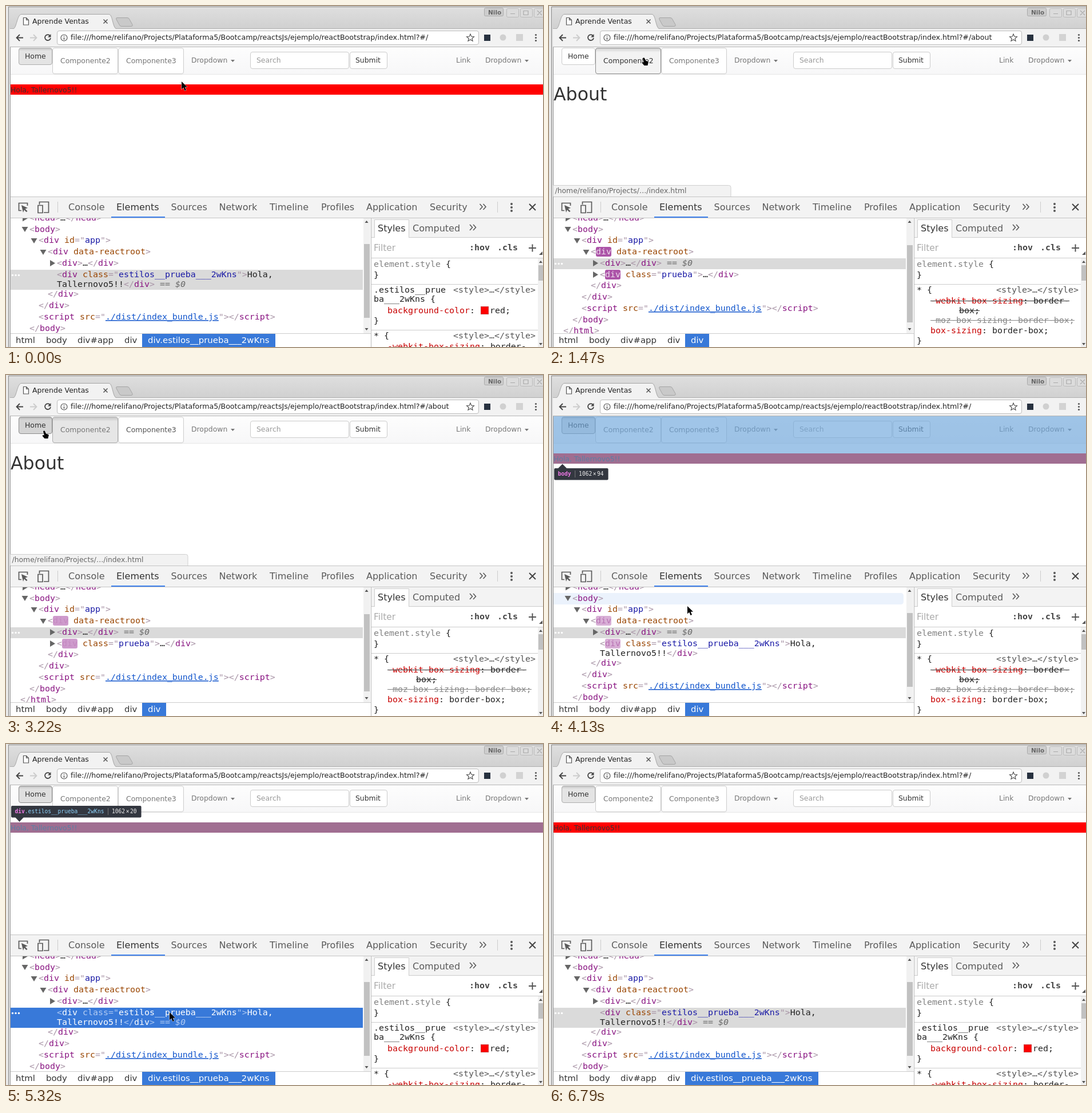
An HTML page for the animation above (6.86 s loop, 939 by 596 pixels).

```html
<!DOCTYPE html>
<html lang="es">
<head>
<meta charset="utf-8">
<style>
html, body { margin: 0; width: 100%; height: 100%; overflow: hidden; background: #fff; }
svg { display: block; }
text { font-family: "DejaVu Sans", sans-serif; white-space: pre; }
.m { font-family: "DejaVu Sans Mono", monospace; }
</style>
</head>
<body>
<svg width="939" height="596" viewBox="0 0 939 596">
  <defs>
    <clipPath id="treeClip"><rect x="8" y="371" width="617" height="201"/></clipPath>
    <linearGradient id="titleFill" x2="0" y2="1"><stop stop-color="#dedede"/><stop offset="1" stop-color="#d0d0d0"/></linearGradient>
    <linearGradient id="navFill" x2="0" y2="1"><stop stop-color="#fdfdfd"/><stop offset="1" stop-color="#f7f7f8"/></linearGradient>
    <linearGradient id="pressed" x2="0" y2="1"><stop stop-color="#000" stop-opacity=".14"/><stop offset=".16" stop-color="#000" stop-opacity="0"/></linearGradient>
  </defs>
  <g id="chrome"></g>
  <g id="live"></g>
</svg>
<script>
const LOOP = 6860, STEP = 70;
const GREETING = 'Hola, ', SCHOOL = 'Tallernovo5!!', CLASS = 'estilos__prueba___2wKns';
const URL_BASE = 'file:///home/relifano/Projects/Plataforma5/Bootcamp/reactsJs/ejemplo/reactBootstrap/index.html?#/';

// SVG string helpers
const text = (x, y, s, size = 15, fill = '#333', extra = '') =>
  `<text x="${x}" y="${y}" font-size="${size}" fill="${fill}" ${extra}>${s}</text>`;
const mono = (x, y, s, fill = '#222', extra = '') => text(x, y, s, 14.95, fill, `class="m" ${extra}`);
const rect = (x, y, w, h, fill, extra = '') =>
  `<rect x="${x}" y="${y}" width="${w}" height="${h}" fill="${fill}" ${extra}/>`;
const box = (x, y, w, h, fill, stroke, r = 3.5) =>
  rect(x + .5, y + .5, w - 1, h - 1, fill, `stroke="${stroke}" rx="${r}"`);
const path = (d, fill = 'none', stroke = 'none', width = 1, extra = '') =>
  `<path d="${d}" fill="${fill}" stroke="${stroke}" stroke-width="${width}" ${extra}/>`;
const dots = (x, y, dx, dy, r, fill) => [-1, 0, 1].map(i =>
  `<circle cx="${x + i * dx}" cy="${y + i * dy}" r="${r}" fill="${fill}"/>`).join('');
const span = (fill, s) => `<tspan fill="${fill}">${s}</tspan>`;
const mix = (a, b, p) => `rgb(${a.map((v, i) => Math.round(v + (b[i] - v) * p))})`;
const caret = x => path(`M${x} 94h7l-3.5 4z`, '#777');

function drawChrome() {
  const out = [];
  const add = (...parts) => out.push(...parts);
  // window frame and title bar
  add(rect(0, 0, 939, 596, '#e9e9e9'), rect(4, 1, 935, 595, '#858585'),
    rect(5, 2, 934, 594, '#e2e2e2'), rect(6, 3, 933, 37, 'url(#titleFill)'), rect(7, 40, 932, 32, '#f2f2f2'),
    path('M7.5 72V596', 'none', '#999'), path('M7 39.5H939', 'none', '#b0b0b0'),
    path('M12 40.5C19 39 19 15 27 14.5H180C187 15 186 39 194 40.5', '#f2f2f2', '#a5a5a5'), rect(12, 40, 182, 2, '#f2f2f2'),
    path('M194 20.5H212q3 0 4 3l5 9q1 3-2 3H202q-3 0-4-3l-5-9q-1-3 1-3z', '#c9c9c9', '#a5a5a5'),
    path('M30.5 20.5h5l4 4v8.5h-9zM35.5 20.5v4h4', '#fff', '#555', 1.2),
    text(46, 31, 'Aprende Ventas', 12.5, '#222'),
    path('M170.5 23.5l7 7m0-7l-7 7', 'none', '#555', 1.5),
    box(836, 3, 34, 15, '#cdcdcd', '#aaa', 2), text(843, 15, 'Nilo', 10.5, '#666', 'font-weight="bold"'));
  for (const x of [875, 899, 923]) add(box(x, 4, 22, 16, '#dcdcdc', '#bababa', 2));
  add(path('M882 13.5h8M905 8.5h8v7h-8zM929 8l8 8m0-8l-8 8', 'none', '#aaa', 1.2));
  // toolbar
  add(path('M30 55.5H19m5-5.5l-5.5 5.5 5.5 5.5', 'none', '#444', 1.8),
    path('M42 55.5H53m-5-5.5l5.5 5.5-5.5 5.5', 'none', '#ccc', 1.8),
    path('M77 52a5 5 0 1 0 1 4', 'none', '#444', 1.8), path('M78.5 49v5.5h-5.5z', '#444'),
    box(89, 43, 738, 25, '#fff', '#bcbcbc'),
    '<circle cx="101.5" cy="55.5" r="5.5" fill="none" stroke="#555" stroke-width="1.2"/>',
    path('M101.5 52v1.5m0 1.5v4', 'none', '#555', 1.4),
    path('M812 49l1.8 4.3 4.6.4-3.5 3 1.1 4.6-4-2.5-4 2.5 1.1-4.6-3.5-3 4.6-.4z', 'none', '#555', 1.2),
    rect(836, 50, 11, 11, '#27313f'), '<circle cx="869" cy="55" r="5.5" fill="#d0d0d0"/>',
    rect(892, 49, 12, 12, '#d3d3d3'), dots(926.5, 55.5, 0, 5, 1.6, '#555'),
    path('M7 71.5H939', 'none', '#b5b5b5'));
  // page and navigation bar
  add(rect(8, 72, 931, 262, '#fff'), rect(8, 72, 931, 47, 'url(#navFill)'), path('M8 119.5H939', 'none', '#e7e7e7'),
    text(324, 99, 'Dropdown', 12.4, '#777'), caret(393),
    box(427, 80, 173, 30, '#fff', '#ccc'), text(438, 99, 'Search', 12.4, '#999'),
    box(601, 80, 66, 30, '#fff', '#ccc'), text(611, 99, 'Submit', 12.4),
    text(787, 99, 'Link', 12.4, '#777'), text(838, 99, 'Dropdown', 12.4, '#777'), caret(907));
  // developer tools
  add(rect(8, 333, 931, 263, '#fff'), rect(8, 333, 931, 37, '#f3f3f3'),
    path('M8 333.5H939M8 370.5H939', 'none', '#c4c4c4'),
    path('M27 357.5H22.5V344.5H37.5V349', 'none', '#5a5a5a', 1.7),
    path('M27 348l11 5-4.5 1.5 4 4-1.8 1.8-4-4L30 361z', '#5a5a5a'),
    path('M58.5 347V342.5H74.5V361H66', 'none', '#5a5a5a', 1.7), path('M56 348.5h8v13h-8z', '#f3f3f3', '#5a5a5a', 1.7),
    path('M90.5 342v19M859.5 342v19', 'none', '#ccc'));
  const tabs = { Console: 109, Elements: 193, Sources: 288.5, Network: 372.5, Timeline: 461, Profiles: 551, Application: 630, Security: 741 };
  for (const [name, x] of Object.entries(tabs)) add(text(x, 357, name, 16, name === 'Elements' ? '#333' : '#5a5a5a'));
  add(rect(184, 368, 94, 2, '#3f82ee'),
    path('M828.5 346l4.5 5-4.5 5m6-10l4.5 5-4.5 5', 'none', '#5a5a5a', 1.6),
    dots(884, 352, 0, 6, 2, '#5a5a5a'), path('M915 346l11 11m0-11l-11 11', 'none', '#444', 2));
  // tree scroll bar, breadcrumb bar
  add(rect(625, 371, 12, 201, '#f1f1f1'), path('M627.5 379h6l-3-4zM627.5 563h6l-3 4z', '#555'),
    path('M8 572.5H638', 'none', '#ccc'), path('M638.5 371V596', 'none', '#bbb'));
  [['html', 17], ['body', 70], ['div#app', 125], ['div', 207]].forEach(([s, x]) => add(text(x, 589, s, 14.9)));
  // styles pane header
  add(rect(639, 371, 300, 34, '#f3f3f3'), path('M639 404.5H939M639 440.5H939', 'none', '#ccc'),
    path('M644.5 405V373.5H704.5V405', '#fff', '#ccc'),
    text(650, 394, 'Styles', 16), text(711, 394, 'Computed', 16, '#5a5a5a'),
    path('M811 382l4.5 5-4.5 5m6-10l4.5 5-4.5 5', 'none', '#5a5a5a', 1.6),
    text(643, 428, 'Filter', 15.4, '#aaa'),
    mono(810, 427, ':hov', '#444', 'font-weight="bold"'), mono(859, 427, '.cls', '#444', 'font-weight="bold"'),
    path('M914 423h13M920.5 416.5v13', 'none', '#555', 2), path('M938 429v6h-6z', '#555'),
    mono(643, 456, span('#808080', 'element.style') + ' {'), mono(643, 475, '}'),
    path('M639 486.5H930', 'none', '#ccc'),
    rect(930, 441, 9, 155, '#f1f1f1'), rect(931, 453, 8, 27, '#c1c1c1'),
    path('M932 449h6l-3-4zM932 589h6l-3 4z', '#555'));
  return out.join('');
}

// Pointer track: time, x, y
const TRACK = [[280, 307, 132], [700, 180, 98], [770, 180, 98], [980, 164, 91], [1680, 164, 91],
  [1960, 232, 90], [2240, 232, 90], [2450, 150, 93], [2730, 150, 93], [3150, 65, 98], [3850, 65, 98],
  [4130, 242, 404], [4200, 242, 404], [4480, 262, 550], [4550, 262, 550], [4900, 286, 469],
  [5320, 286, 469], [5670, 425, 477], [5880, 425, 477], [6300, 948, 18]];

function pointerAt(t) {
  const next = TRACK.findIndex(k => k[0] > t);
  if (next === 0) return TRACK[0].slice(1);
  if (next < 0) return TRACK.at(-1).slice(1);
  const a = TRACK[next - 1], b = TRACK[next];
  const u = (t - a[0]) / (b[0] - a[0]), e = u * u * (3 - 2 * u);
  return [1, 2].map(i => a[i] + (b[i] - a[i]) * e);
}

// Page changes: time, page
const VISITS = [[0, 'home'], [1260, 'about'], [1960, 'ejemplos'], [2520, 'about'], [3290, 'home']];

// Tree rows while the home page is shown: top, bottom, element
const ROWS = [[381, 400, 'body'], [400, 420, '#app'], [420, 440, 'root'], [440, 460, 'nav'], [460, 496, 'hello'],
  [496, 515, 'root'], [515, 535, '#app'], [535, 554, ''], [554, 572, 'body']];

function drawButtons(page, hover, t) {
  const home = page === 'home', homeHover = hover === 'home', focused = home && t >= 3290 && t < 6720;
  const shade = (x, w, h) => rect(x + 1, 74, w - 2, h, 'url(#pressed)', 'rx="3"');
  let out = box(22, 73, 59, 30, homeHover ? '#d4d4d4' : focused ? '#dfdfdf' : home ? '#e4e4e4' : '#fff',
    homeHover || focused ? '#8c8c8c' : home ? '#adadad' : '#ccc');
  if (home || homeHover) out += shade(22, 59, 28);
  out += text(33, 92, 'Home', 12.45);
  [['about', 81, 'Componente2'], ['ejemplos', 196, 'Componente3']].forEach(([id, x, label]) => {
    const hovered = hover === id, active = page === id;
    const fill = !active ? '#fff' : hovered ? '#f3f3f3' : '#e6e6e6';
    out += box(x, 73, 115, 46, fill, hovered ? '#8c8c8c' : active ? '#adadad' : '#ccc');
    if (active) out += shade(x, 115, 44);
    const visited = id === 'ejemplos' && page === 'about' && t >= 2520;
    out += text(x + 14, 100, label, 12.45, hovered ? '#333' : visited ? '#555' : '#777');
  });
  return out;
}

const NORMAL = { mark: '#a894a6', tag: '#881280', name: '#994500', value: '#1a1aa6', text: '#222', ref: '#666' };
const CHOSEN = { mark: '#a9c6f2', tag: '#fff', name: '#b5cdf3', value: '#fff', text: '#fff', ref: '#b5cdf3' };

function drawTree(page, selected, blue, hoverRow, fade) {
  const home = page === 'home';
  const open = (name, attrs = '', c = NORMAL, tag = c.tag) =>
    span(c.mark, '&lt;') + span(tag, name) + attrs + span(c.mark, '&gt;');
  const close = (name, c = NORMAL) => span(c.mark, '&lt;/') + span(c.tag, name) + span(c.mark, '&gt;');
  const attr = (name, value, c = NORMAL) =>
    ' ' + span(c.name, name) + span(c.mark, '="') + span(c.value, value) + span(c.mark, '"');
  const down = (x, y) => path(`M${x - 5.5} ${y - 4}h11l-5.5 9z`, '#666');
  const right = (x, y) => path(`M${x - 4} ${y - 5.5}v11l9-5.5z`, '#666');
  const ref = c => span(c.ref, ' == <tspan font-style="italic">$0</tspan>');
  const flashTag = mix([255, 255, 255], [136, 18, 128], fade);
  const flash = (x, y) => fade < 1
    ? rect(x + 9, y - 13, 27, 17, `rgba(158,54,153,${1 - fade})`, 'rx="3"') : '';

  let out = '';
  if (hoverRow) out += path(`M8 ${hoverRow[0]}H615q5 0 5 5V${hoverRow[1] - 4}q0 5-5 5H8z`, '#ebf2fc');
  const second = selected === 'hello';
  out += second ? rect(8, 461, 616, 35, blue ? '#3879d9' : '#dadada') : rect(8, 441, 616, 19, '#dadada');
  out += dots(17, second ? 470.5 : 450.5, 5.5, 0, 1.7, '#fff');
  out += right(33, 371) + mono(41, 375, open('head') + '…' + close('head'));
  out += down(33, 390) + mono(41, 395, open('body'));
  out += down(49, 410) + mono(57, 414, open('div', attr('id', 'app')));
  out += down(65, 430) + flash(73, 434) + mono(73, 434, open('div', ' ' + span(NORMAL.name, 'data-reactroot'), NORMAL, flashTag));
  out += right(81, 449.5) + mono(89, 454, open('div') + '…' + close('div') + (second ? '' : ref(NORMAL)));
  const c = blue ? CHOSEN : NORMAL, tag = blue ? c.tag : flashTag;
  out += flash(89, 474);
  if (home) {
    out += mono(89, 474, open('div', attr('class', CLASS, c), c, tag) + span(c.text, GREETING));
    out += mono(89, 491, span(c.text, SCHOOL) + close('div', c) + (second ? ref(c) : ''));
  } else {
    out += right(81, 469.5) +
      mono(89, 474, open('div', page === 'about' ? attr('class', 'prueba') : '', c, tag) + '…' + close('div'));
  }
  const y = home ? 508 : 493;
  const src = ' ' + span(NORMAL.name, 'src') + span(NORMAL.mark, '="') +
    '<tspan fill="#1155cc" text-decoration="underline">./dist/index_bundle.js</tspan>' + span(NORMAL.mark, '"');
  out += mono(73, y, close('div')) + mono(57, y + 20, close('div')) +
    mono(57, y + 40, open('script', src) + close('script')) +
    mono(41, y + 60, close('body')) + mono(25, y + 79, close('html'));

  const crumb = second ? [233, 'div.' + CLASS] : [42, 'div'];
  return `<g clip-path="url(#treeClip)">${out}</g>` +
    (home ? rect(626, 416, 10, 129, '#c1c1c1') : rect(626, 418, 10, 135, '#c1c1c1')) +
    rect(238, 573, crumb[0], 23, '#3879d9') + text(248, 589, crumb[1], 14.9, '#fff');
}

function drawStyles(selected) {
  const red = s => span('#c80000', s);
  const origin = y => mono(782, y, '&lt;style&gt;…&lt;/style&gt;', '#555');
  const strike = (x, y, n, fill) => path(`M${x} ${y - 4.5}h${n * 9}`, 'none', fill);
  const webkit = y => mono(667, y, red('-webkit-box-sizing') + ': border-');
  if (selected === 'hello')
    return mono(643, 501, '.estilos__prue') + origin(501) + mono(643, 517, 'ba___2wKns {') +
      mono(667, 537, red('background-color') + ':') + box(830, 525, 14, 14, '#f00', '#c33', 0) + mono(846, 537, 'red;') +
      mono(643, 555, '}') + path('M639 566.5H930', 'none', '#ccc') + mono(643, 581, '* {') + origin(581) + webkit(600);
  return mono(643, 501, '* {') + origin(501) + webkit(520) + strike(667, 520, 27, '#333') +
    mono(717, 537, 'box;') + strike(717, 537, 4, '#333') +
    mono(667, 554, '-moz-box-sizing: border-box;', '#888') + strike(667, 554, 28, '#888') +
    mono(667, 572, red('box-sizing') + ': border-box;') + mono(643, 590, '}');
}

function drawOverlay(target) {
  const hello = target === 'hello', nav = target === 'nav';
  const [top, bottom] = hello ? [137, 155] : nav ? [72, 120] : [72, 155];
  const tag = target === 'body' ? 'body' : 'div';
  const suffix = hello ? '.' + CLASS : target === '#app' ? '#app' : '';
  const y = hello ? 108 : bottom + 8, chars = (tag + suffix).length * 5.78;
  const size = (x, s) => text(x, y + 13, s, 9.6, '#eee', 'class="m"');
  return rect(8, top, 931, bottom - top, 'rgba(111,168,220,.66)') +
    rect(9, y, chars + 71.5, 20.5, '#333740', 'rx="2"') +
    path(hello ? `M16 ${y + 20}h15l-7.5 8z` : `M16 ${y}h15l-7.5-7.5z`, '#333740') +
    text(15.5, y + 13, span('#ee78e6', `<tspan font-weight="bold">${tag}</tspan>`) + span('#8ed3fb', suffix), 9.6, '#fff', 'class="m"') +
    path(`M${chars + 22.5} ${y + 4}v12`, 'none', '#777') +
    size(chars + 29, `1062<tspan dx="1.5">×</tspan><tspan dx="1.5">${hello ? 20 : nav ? 54 : 94}</tspan>`);
}

function drawPointer(x, y, hand) {
  const d = hand
    ? 'M0 1Q1-2 3 0L5 4.5 9 6Q10.5 7 9 10L8.5 13H2.5L-1 9Q-2 6.5 1 7L2 7.5Z'
    : 'M0 0V13.5L3.2 10.6 5.5 16 8 15 5.7 9.7H10Z';
  return path(d, '#000', '#fff', 1, `transform="translate(${x} ${y})" paint-order="stroke"`);
}

function render(t) {
  const [x, y] = pointerAt(t);
  const [changed, page] = VISITS.filter(v => v[0] <= t).at(-1);
  const hover = y > 73 && y < 119 && x < 311 ? (x < 81 ? 'home' : x < 196 ? 'about' : 'ejemplos') : '';
  const row = x < 624 && ROWS.find(r => y - 5 >= r[0] && y - 5 < r[1]);
  const selected = t < 1260 || t >= 4900 ? 'hello' : 'nav';
  const fade = changed ? Math.min(1, (t - changed) / 1400) : 1;

  let out = text(113, 59, URL_BASE + (page === 'home' ? '' : page), 12.6, '#222');
  out += drawButtons(page, hover, t);
  out += page === 'home'
    ? rect(8, 137, 931, 18, '#f00') + text(8, 150.5, GREETING + SCHOOL, 12.4)
    : text(8, 165, page === 'about' ? 'About' : 'Ejemplos', 31.6);
  if (t >= 840 && t < 3990)
    out += path('M7.5 333V313.5H314.5q3.5 0 3.5 3.5V333', '#f2f2f2', '#d0d0d0') +
      text(10.5, 327, '/home/relifano/Projects/…/index.html', 12.4, '#666');
  if (row && row[2]) out += drawOverlay(row[2]);
  out += drawTree(page, selected, t >= 4900 && t < 6720, row, fade) + drawStyles(selected);
  return out + drawPointer(x, y, !!hover);
}

document.getElementById('chrome').innerHTML = drawChrome();
const live = document.getElementById('live');
const start = performance.now();
let shown = -1;
function tick() {
  const t = Math.floor((performance.now() - start) % LOOP / STEP) * STEP;
  if (t !== shown) live.innerHTML = render(shown = t);
  requestAnimationFrame(tick);
}
tick();
</script>
</body>
</html>
```
